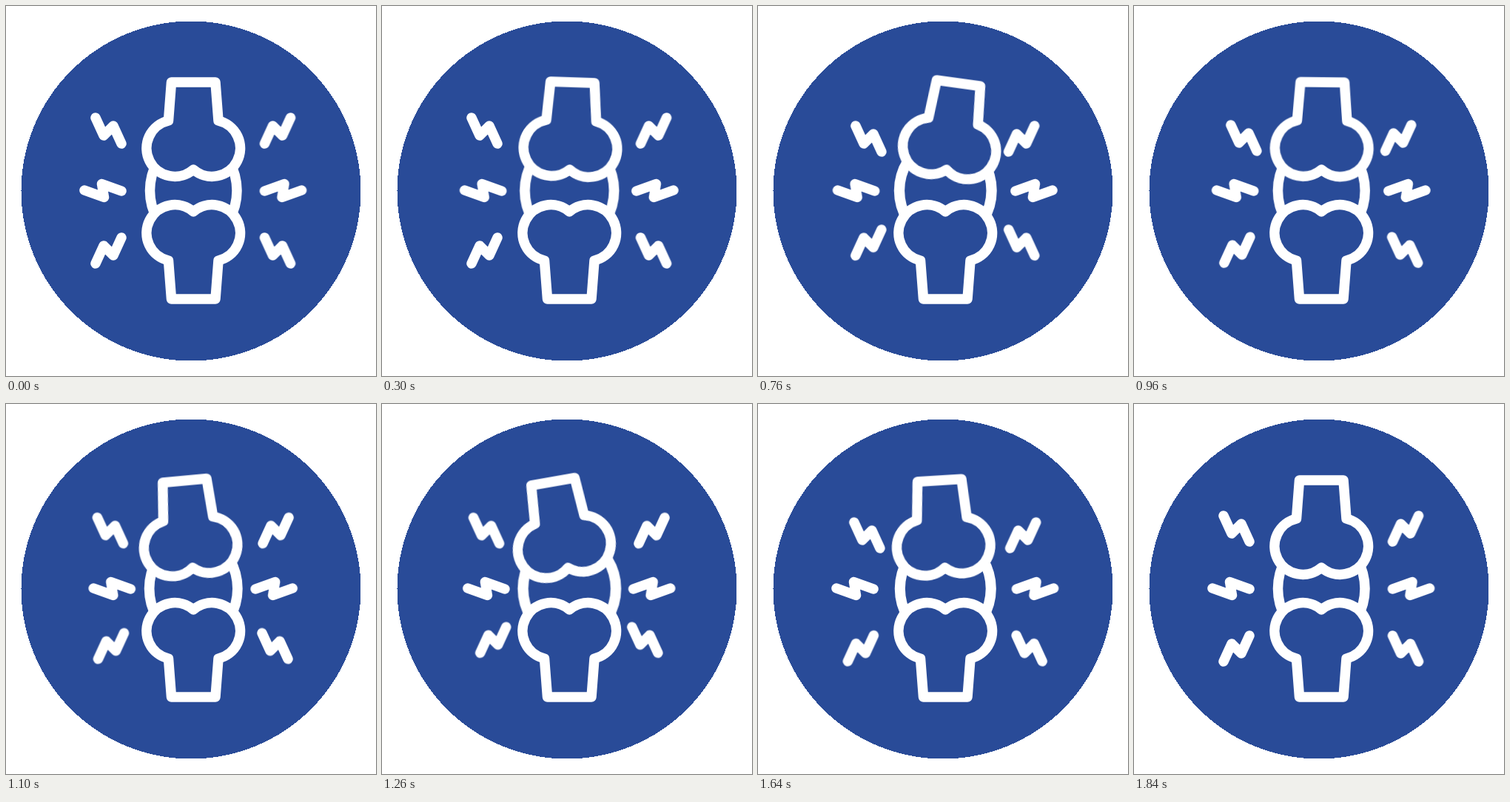
Write an HTML page without scripts that moves like this. It is 500 px wide and 500 px high and loops after 2 s.

```html
<!DOCTYPE html>
<html lang="en">
<head>
<meta charset="utf-8">
<title>Joint pain</title>
<style>
  html, body { margin: 0; width: 100%; height: 100%; overflow: hidden; background: #fff; }
  svg { display: block; width: 100%; height: 100%; }

  .ink { fill: none; stroke: #fff; stroke-width: 13.5; stroke-linecap: round; stroke-linejoin: round; }
  .disc, .bone { fill: #294b98; }

  .femur, .disk, .bolt {
    animation: 2s cubic-bezier(.333, 0, .667, 1) infinite;
  }
  .femur { transform-origin: 253.25px 232px; animation-name: swing; }
  .disk { transform-origin: 253.25px 249.5px; animation-name: bulge; }
  .bolt { animation-name: jab; }
  .mid { --dx: 13px; --dy: 0px; }
  .low { --dx: 13px; --dy: -13px; animation-delay: -1.82s; }
  .top { --dx: 13px; --dy: 13px; animation-delay: -1.64s; }

  @keyframes swing {
    0%, 8%, 92%, 100% { transform: rotate(0deg); }
    32.5% { transform: rotate(9.3deg); }
    66.5% { transform: rotate(-10.5deg); }
  }
  @keyframes bulge {
    0%, 8%, 50%, 92%, 100% { transform: scaleX(1); }
    29%, 71% { transform: scaleX(1.1); }
  }
  @keyframes jab {
    0%, 8%, 41%, 74%, 100% {
      transform: translate(0, 0);
      animation-timing-function: cubic-bezier(.333, .1, .667, 1);
    }
    24.5%, 57.5% {
      transform: translate(var(--dx), var(--dy));
      animation-timing-function: cubic-bezier(.333, 0, .667, .9);
    }
  }
</style>
</head>
<body>
<svg viewBox="0 0 500 500">
  <circle class="disc" cx="250" cy="250" r="229.5" shape-rendering="crispEdges"/>

  <g class="ink">
    <path class="disk" d="M205.2 209.5A80 80 0 0 0 205.2 289.5M301.3 209.5A80 80 0 0 1 301.3 289.5"/>

    <path class="bone" d="M223.5 396H283L287 344A38.2 38.2 0 1 0 253.25 278A38.2 38.2 0 1 0 219.5 344Z"/>
    <path class="bone femur" d="M223.5 103H283L287 155A38.2 38.2 0 1 1 253.25 221A38.2 38.2 0 1 1 219.5 155Z"/>

    <g>
      <path class="bolt top" d="M121 151L132 175L145 162L156 186"/>
      <path class="bolt mid" d="M106 249L132.5 258.5L129.5 240.5L156 250"/>
      <path class="bolt low" d="M121 348L132 324L145 337L156 313"/>
    </g>
    <g transform="translate(505.5) scale(-1 1)">
      <path class="bolt top" d="M121 151L132 175L145 162L156 186"/>
      <path class="bolt mid" d="M106 249L132.5 258.5L129.5 240.5L156 250"/>
      <path class="bolt low" d="M121 348L132 324L145 337L156 313"/>
    </g>
  </g>
</svg>
</body>
</html>
```
